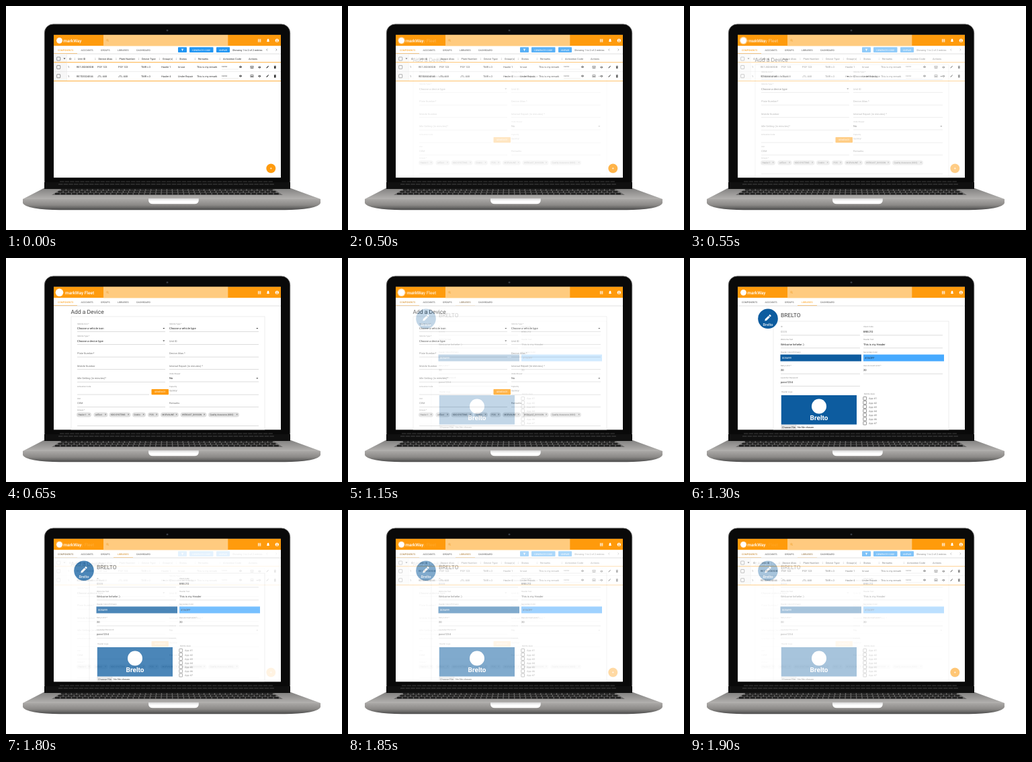
These frames come from a looping animation (500 by 333 pixels, 1.95 s). An HTML page:

```html
<!DOCTYPE html>
<html lang="en">
<head>
<meta charset="utf-8">
<title>Device manager on a laptop</title>
<style>
html, body { margin: 0; width: 100%; height: 100%; overflow: hidden; background: #fff; }
svg { display: block; width: 100vw; height: 100vh; }
text { font-family: Roboto, Arial, sans-serif; text-rendering: geometricPrecision; white-space: pre; }
</style>
</head>
<body>
<svg id="stage" viewBox="0 0 500 333" preserveAspectRatio="none"></svg>
<script>
const ORANGE = '#ff9b0d', BLUE = '#2196f3', NAVY = '#0d5c9f', INK = '#333', GREY = '#8a8a8a';

const rect = (x, y, w, h, fill, more = '') =>
  `<rect x="${x}" y="${y}" width="${w}" height="${h}" fill="${fill}" ${more}/>`;
const disc = (x, y, r, fill) => `<circle cx="${x}" cy="${y}" r="${r}" fill="${fill}"/>`;
const path = (d, fill, more = '') => `<path d="${d}" fill="${fill}" ${more}/>`;
const text = (x, y, s, size = 4, fill = INK, more = '') =>
  `<text x="${x}" y="${y}" font-size="${size}" fill="${fill}" ${more}>${s}</text>`;
const mid = 'text-anchor="middle"';
const hline = (x1, x2, y, color = '#bbb', w = .5) => rect(x1, y - w / 2, x2 - x1, w, color);
const box = (x, y, s = 5) => rect(x, y, s, s, '#fff', 'rx=".5" stroke="#666" stroke-width=".7"');
const arrow = (x, y) => path(`M${x - 1.5} ${y - .7}h3l-1.5 1.6z`, INK);

const eye = (x, y) => path(`M${x - 2.1} ${y}q2.1-3 4.2 0q-2.1 3-4.2 0`, INK) + disc(x, y, .7, '#fff');
const pencil = (x, y, k, fill) => `<g transform="translate(${x} ${y}) rotate(45) scale(${k})">` +
  path('M-.7-2.8h1.4v1h-1.4zM-.7-1.5h1.4v3.2l-.7 1-.7-1z', fill) + '</g>';
const trash = (x, y) => path(`M${x - 1.6} ${y - 2}h1l.3-.4h.6l.3.4h1v.6h-3.2zM${x - 1.3} ${y - 1.1}h2.6v3.3h-2.6z`, INK);
const tablet = (x, y) => rect(x - 2, y - 1.5, 4, 3, 'none', `stroke="${INK}" stroke-width=".6"`) +
  hline(x - 1.2, x + 1.2, y + .3, INK, .7);

function header(title, titleX, logoR, active) {
  let s = rect(71, 42.7, 338, 213, '#fff') + rect(71, 42.7, 338, 16.5, ORANGE) +
    rect(145, 42.7, 185.3, 16.5, '#ffcb7f') +
    disc(79.5, 51.3, logoR, '#fff') +
    text(titleX, 53.8, title, 6.5, '#fff', 'font-weight="500"') +
    '<circle cx="150.8" cy="50.8" r="1.2" fill="none" stroke="#f0a030" stroke-width=".6"/>' +
    path('M151.7 51.7l1.2 1.2', 'none', 'stroke="#f0a030" stroke-width=".6"');
  for (let i = 0; i < 9; i++)
    s += rect(374.9 + i % 3 * 1.6, 49.2 + Math.floor(i / 3) * 1.6, 1.2, 1.2, '#fff');
  s += path('M388 53v-.5l.6-.6v-1.5q0-1.4 1.4-1.7t1.4 1.7v1.5l.6.6v.5zM389.4 53.4h1.2q-.6 1-1.2 0', '#fff') +
    disc(403.3, 51.3, 2.6, '#fff') + disc(403.3, 50.5, .85, ORANGE) +
    path('M401.7 52.7q1.6-1.3 3.2 0q-1.6 1.5-3.2 0', ORANGE);
  const tabs = [['COMPONENTS', 77, 23], ['ACCOUNTS', 111.5, 18], ['GROUPS', 141, 13],
    ['LIBRARIES', 166, 17], ['DASHBOARD', 194.3, 20]];
  tabs.forEach(([name, x, w], i) => {
    const on = i === active;
    s += text(x, 66.6, name, 3.5, on ? ORANGE : '#555');
    if (on) s += hline(x - 6, x + w + 6, 70.4, ORANGE, .6);
  });
  return s + hline(71, 409, 71.1, '#d2d2d2', .7);
}

function listPage() {
  const button = (x, w, label) => rect(x, 61.3, w, 7.8, BLUE, 'rx=".8"') +
    text(x + w / 2, 66.5, label, 3.5, '#fff', mid);
  let s = header('markWay', 85.3, 4.4, 0) + button(256, 13, '') +
    path('M260.7 63.8h3.6l-1.4 1.6v1.6h-.8v-1.6z', '#fff') +
    button(273, 35.5, 'GENERATE CODE') + button(313, 20, 'UNPAIR') +
    text(337, 66.7, 'Showing 1 to 2 of 2 entries', 3.75) +
    path('M389 63.6l-1.4 1.5 1.4 1.5M401.6 63.6l1.4 1.5-1.4 1.5', 'none', 'stroke="#555" stroke-width=".6"') +
    rect(71, 71.5, 19, 39.5, '#f7f7f7') + box(75.7, 76) + arrow(87, 78.3);
  const heads = [['ID', 94], ['Unit ID', 107], ['Device Alias', 137.5], ['Plate Number', 168.5],
    ['Device Type', 202], ['Group(s)', 233], ['Status', 258], ['Remarks', 286],
    ['Activation Code', 323], ['Actions', 361]];
  heads.forEach(([name, x], i) => {
    s += text(x, 80, name, 3.85);
    if (i && i < 9) s += path(`M${x - 5.5} 78.2l.9-1.2.9 1.2zM${x - 5.5} 79l.9 1.2.9-1.2z`, '#bbb');
  });
  const cols = [92, 105, 136, 167, 201, 231, 256, 284, 321];
  const rows = [
    ['1', 'RE7J5DSK5DB', 'PSY 123', 'PSY 123', 'TMR v.3', 'Hauler 1', 'In-use', 'This is my remark', '*****'],
    ['1', 'RE7D3D24E44', 'JTL 448', 'JTL 448', 'TMR v.3', 'Hauler 4', 'Under Repair', 'This is my remark', '*****']];
  rows.forEach((row, i) => {
    const y = 92.2 + i * 13.3;
    row.forEach((v, c) => s += text(cols[c], y, v, 3.85));
    s += box(75.7, y - 3.8) + hline(321, 346, y + 1.8, '#ddd') + eye(349, y - 1.6) +
      tablet(366, y - 1.3) + eye(377.3, y - 1.3) + pencil(389, y - 1.3, .85, INK) +
      trash(400.3, y - 1.3);
  });
  return s + hline(71, 409, 83.8, ORANGE, .8) + hline(71, 409, 97.7, '#ddd') +
    hline(71, 409, 111.4, ORANGE, .8) + rect(90, 71.5, .4, 39.5, '#ddd') +
    disc(394.3, 241.8, 7.1, '#eee') + disc(394.3, 241.4, 6.9, ORANGE) +
    path('M392.9 241.4h2.8M394.3 240v2.8', 'none', 'stroke="#fff" stroke-width=".6"');
}

const card = (x, y) => rect(x, y, 385 - x, 256 - y, '#fff', 'stroke="#e4e4e4" stroke-width=".7"');

function formPage() {
  const L = 106, R = 243, ends = { [L]: 237, [R]: 376 };
  const label = (x, y, s) => text(x, y, s, 2.9, GREY);
  const select = (x, y, name, value) => label(x, y - 7.2, name) + text(x, y, value, 4.1, '#222') +
    arrow(ends[x] - 2.2, y - 1.4) + hline(x, ends[x], y + 3.7);
  const input = (x, y, s) => text(x, y, s, 3.9, '#777') + hline(x, ends[x], y + 3.9);
  let s = header('markWay Fleet', 88, 5.8, 0) + text(96.5, 82.7, 'Add a Device', 8.5, '#444') + card(97, 87) +
    select(L, 106, 'Vehicle Icon *', 'Choose a vehicle icon') +
    select(R, 106, 'Vehicle Type *', 'Choose a vehicle type') +
    select(L, 124.6, 'Vehicle Type *', 'Choose a device type') + input(R, 124.6, 'Unit ID') +
    input(L, 143.2, 'Plate Number*') + input(R, 143.2, 'Device Alias *') +
    input(L, 161.8, 'Mobile Number') + input(R, 161.8, 'Internal Report (in minutes) *') +
    input(L, 180.3, 'Idle Setting (in minutes)*') + select(R, 180.3, 'Under Repair', 'No') +
    label(L, 191.6, 'Activation Code') + hline(L, 213, 203) +
    rect(216.5, 195, 25.5, 8.2, ORANGE, 'rx=".8"') + text(229.2, 200.3, 'GENERATE', 3.3, '#fff', mid) +
    label(R, 191.6, 'Capacity') + input(R, 199.2, 'YYYYY') +
    label(L, 210, 'Unit') + input(L, 217.4, 'CBM') + input(R, 217.4, 'Remarks') + label(L, 227.2, 'Groups *');
  const chips = [['Hauler 1', 105, 22], ['adTest', 130.5, 21], ['KDO-SYSTEMS', 153.5, 32], ['Grublo', 188, 20],
    ['POS', 211, 16.5], ['MORVALINE', 230, 27], ['WEBCAST_DIVISION', 259.5, 39], ['Quality Assurance (KDO)', 301, 46]];
  chips.forEach(([name, x, w]) => s += rect(x, 229.4, w, 7.2, '#e0e0e0', 'rx="3.6"') +
    text(x + 2.6, 234.2, name, 3.2, '#444') + text(x + w - 4.5, 234.3, '×', 4.4, '#555'));
  return s + hline(L, 376, 249.3);
}

function clientPage() {
  const L = 135, R = 258, ends = { [L]: 253, [R]: 376 };
  const label = (x, y, s) => text(x, y, s, 2.9, GREY);
  const field = (x, y, name, value, fill = '#222') => label(x, y - 7.3, name) +
    text(x, y, value, 4.1, fill) + hline(x, ends[x], y + 4.3);
  let s = header('markWay', 85.3, 4.4, 3) + card(124, 94) +
    disc(116, 90.2, 15.2, '#fff') + disc(116, 90.2, 14.8, NAVY) + pencil(115.5, 89.3, 2.2, '#fff') +
    text(116, 100.5, 'Brelto', 5.6, '#c5d7e7', mid + ' font-weight="700"') +
    text(135, 88, 'BRELTO', 8.5, '#444') +
    field(L, 110.6, 'ID', '0335', '#aaa') + field(R, 110.6, 'Client Code', 'BRELTO') +
    field(L, 129.6, 'Welcome Text', 'Welcome hehehe :)') + field(R, 129.6, 'Header Text', 'This is my Header') +
    label(L, 141.2, 'Header Color (Primary)') + rect(134.5, 143.5, 120.5, 10, NAVY) +
    text(137, 150, '005699', 4.1, '#fff') +
    label(R, 141.2, 'Secondary Color') + rect(258, 143.5, 120, 10, '#47aaff') +
    text(260, 150, '47AOFF', 4.1, '#234') +
    field(L, 167.8, 'Retry Limit *', '20') + field(R, 167.8, 'User Account Limit *', '20') +
    field(L, 186.3, 'Launcher Password', 'pass1234') +
    label(L + 1, 200, 'Header Logo') + rect(135.8, 204, 112.2, 43.5, NAVY) +
    disc(192, 220.5, 11, '#fff') +
    text(192, 241, 'Brelto', 10, '#fff', mid + ' font-weight="700"') +
    rect(136, 248.7, 22, 5.3, '#eee', 'stroke="#aaa" stroke-width=".4"') +
    text(147, 252.9, 'Choose File', 3.8, '#222', mid) + text(160, 252.9, 'No file chosen', 3.8, '#222') +
    label(R + 1, 202.6, 'Mobile Apps');
  for (let i = 0; i < 7; i++) {
    const y = 210.4 + i * 6.13;
    s += box(257.8, y - 4, 4.8) + text(266, y, 'App #' + (i + 1), 3.8, '#777');
  }
  return s;
}

function keys(x, y, w, h, count, fill) {
  const step = w / count;
  let s = '';
  for (let i = 0; i < count; i++) s += rect(x + i * step, y, step * .85, h, fill);
  return s;
}

function laptop() {
  let s = `<defs>
    <linearGradient id="deck" x2="0" y2="1"><stop stop-color="#828180"/><stop offset="1" stop-color="#b3b1af"/></linearGradient>
    <linearGradient id="lip" x2="0" y2="1"><stop stop-color="#aaa8a6"/><stop offset=".55" stop-color="#8b8987"/><stop offset="1" stop-color="#4a4a4a"/></linearGradient>
    <linearGradient id="notch" x2="0" y2="1"><stop stop-color="#d8d8d8"/><stop offset=".5" stop-color="#fff"/></linearGradient>
    <clipPath id="screen"><rect x="71" y="42.7" width="338" height="212.5"/></clipPath></defs>` +
    rect(57.3, 27, 365.4, 246, '#090909', 'rx="13" stroke="#666" stroke-width=".9"') +
    disc(240, 36.2, 1.5, '#292b30') + disc(240, 36.2, .6, '#55606c') +
    path('M56 271H424L468 287H25Z', 'url(#deck)') +
    path('M57 262H423V272H57Z', '#101010') +
    keys(80, 260, 318, 2, 42, '#242424') + keys(78, 264, 322, 2, 42, '#2b2b2b') +
    path('M82 272H398L412 281H68Z', '#6a6968');
  for (let row = 0; row < 3; row++)
    s += keys(82 - row * 4.5, 272.3 + row * 2.9, 316 + row * 9, 2.2, 40, '#1a1a1a');
  return s + path('M25 287H468V293Q466 298 452 300.5Q435 303.3 415 303.3H80Q58 303.3 42 300.5Q27 298 25 293Z', 'url(#lip)') +
    path('M212 286H286.8V289Q286.3 294.3 280.5 294.3H218.5Q212.5 294.3 212 289Z', 'url(#notch)');
}

const stage = document.getElementById('stage');
stage.innerHTML = laptop() + '<g clip-path="url(#screen)">' +
  [listPage, formPage, clientPage].map(page => `<g class="page">${page()}</g>`).join('') + '</g>';
const pages = stage.querySelectorAll('.page');

// start time, share of the form page, share of the client page; the list fills the rest
const mixes = [[0, 0, 0], [500, .25, 0], [550, .5, 0], [600, .75, 0], [650, 1, 0],
  [1150, .75, .25], [1200, .5, .5], [1250, .25, .75], [1300, 0, 1],
  [1800, .14, .74], [1850, .1, .52], [1900, .07, .36]];

function draw() {
  const t = performance.now() % 1950;
  const [, form, client] = mixes.findLast(m => m[0] <= t);
  pages[1].setAttribute('opacity', client < 1 ? form / (1 - client) : 0);
  pages[2].setAttribute('opacity', client);
  requestAnimationFrame(draw);
}
draw();
</script>
</body>
</html>
```
